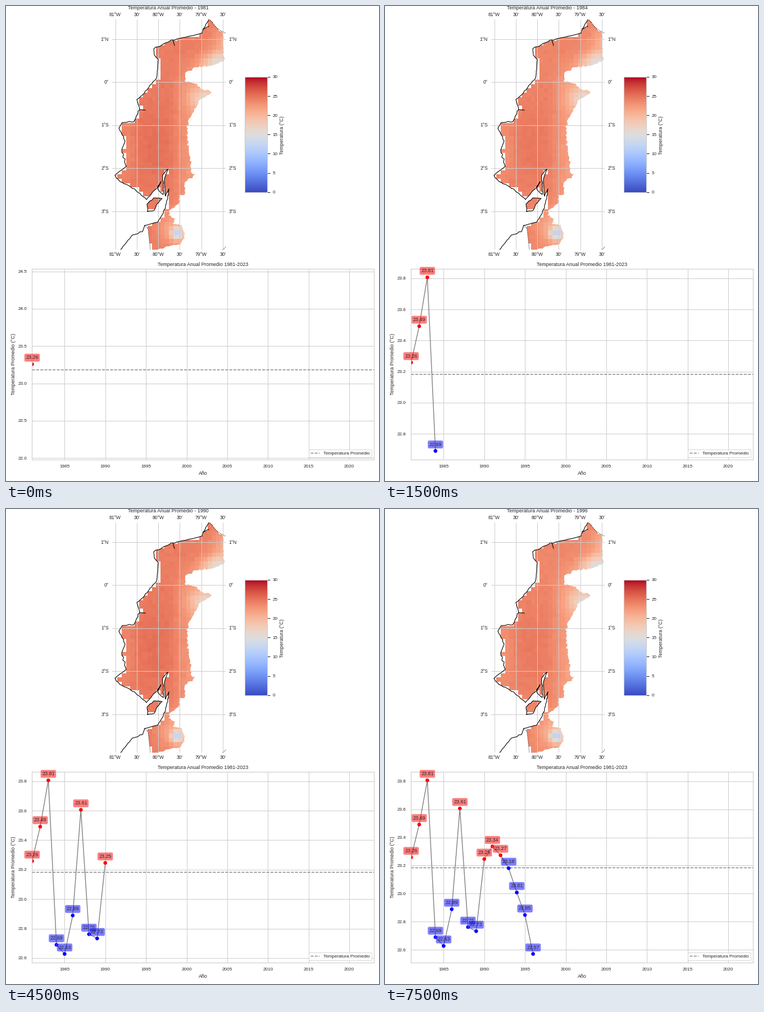
A matplotlib script for the animation above (8 s loop, 664x844 px).

```python
import numpy as np
import matplotlib.pyplot as plt
from matplotlib.animation import FuncAnimation
from matplotlib.path import Path

W, H = 664, 844
INK, GRID = "0.15", "0.8"
BIG, SMALL = 8.85, 8.1
plt.rcParams.update({
    "font.family": ["Liberation Sans", "DejaVu Sans"],
    "text.color": INK, "axes.labelcolor": INK,
    "xtick.color": INK, "ytick.color": INK,
    "axes.edgecolor": GRID, "axes.linewidth": 1.1,
    "grid.color": GRID, "grid.linewidth": 1.0,
    "legend.fontsize": SMALL,
})

FIRST, LAST = 1981, 2023
TEMPS = [23.258, 23.4917, 23.806, 22.69, 22.628, 22.889, 23.606, 22.762,
         22.733, 23.246, 23.336, 23.273, 23.181, 23.008, 22.848, 22.571]
MEAN = 23.185

# Map geometry, in stage pixels
DEG, LON80, EQUATOR = 76.5, 271, 135
LEFT, TOP, RIGHT, BOTTOM = 189, 24, 391, 433
CELL = DEG / 10
ROWS, COLS = 54, 27

# Key points only; rough() adds the small detail
COAST = [(361, 24), (351, 41), (349, 48), (330, 53), (303, 59), (283, 66),
         (263, 76), (264, 87), (271, 95), (268, 128), (243, 158), (233, 166),
         (238, 184), (227, 206), (207, 207), (201, 217), (212, 240),
         (206, 256), (214, 285), (194, 301), (203, 312), (229, 325),
         (250, 344), (266, 326), (276, 312), (270, 325), (280, 335),
         (279, 300), (288, 290), (282, 308), (284, 338), (290, 325),
         (288, 342), (280, 368), (270, 384), (247, 390)]
PERU = [(247, 390), (243, 401), (225, 407), (203, 434)]
INLETS = [[(297, 60), (300, 70)], [(238, 184), (248, 185)],
          [(351, 41), (361, 36)]]
ISLAND = [(252, 365), (251, 352), (263, 341), (278, 342), (268, 353),
          (264, 363), (252, 365)]
EAST = [(363, 24), (386, 48), (388, 97), (366, 106), (345, 107), (321, 117),
        (318, 133), (340, 138), (347, 147), (366, 153), (347, 165),
        (324, 205), (322, 230), (326, 255), (330, 296), (337, 298),
        (318, 314), (318, 335), (308, 336), (308, 350), (291, 363),
        (289, 372), (301, 378), (297, 387), (313, 389), (318, 412),
        (309, 424), (290, 427), (270, 433)]
BORDERS = [[(247, 390), (253, 396), (257, 433)],
           [(363, 25), (377, 41), (392, 49)],
           [(386, 433), (392, 427)]]

# Warm and cool spots: x, y, x spread, y spread, degrees
SPOTS = [(262, 245, 36, 85, 0.9), (214, 255, 14, 60, -0.8),
         (378, 104, 28, 20, -8), (394, 68, 26, 32, -3.5),
         (353, 165, 24, 20, -6), (305, 404, 11, 10, -9),
         (302, 394, 28, 30, -3.5)]


def rough(points, amp, step, seed):
    """Subdivide a polyline and shake the new points, keeping the key ones."""
    rng = np.random.default_rng(seed)
    pts = np.array(points, float)
    out = [pts[:1]]
    for a, b in zip(pts[:-1], pts[1:]):
        n = max(1, int(np.hypot(*(b - a)) / step))
        part = a + (b - a) * np.linspace(0, 1, n + 1)[1:, None]
        part[:-1] += rng.normal(0, amp, (n - 1, 2))
        out.append(part)
    return np.vstack(out)


def polygon(*parts):
    pts = np.vstack(parts)
    return Path(np.vstack([pts, pts[:1]]), closed=True)


coast = rough(COAST, 0.6, 4, 1)
peru = rough(PERU, 0.5, 4, 2)
island = rough(ISLAND, 0.4, 4, 3)
east = rough(EAST, 0.9, 3, 4)
region = Path.make_compound_path(polygon(coast, BORDERS[0], east[::-1]),
                                 polygon(island))

X_EDGES = LON80 + (np.arange(COLS + 1) - 10.5) * CELL
Y_EDGES = EQUATOR + (np.arange(ROWS + 1) - 14.5) * CELL


def base_field():
    """Mean temperature per cell; cells that reach into the sea are empty."""
    x, y = np.meshgrid(X_EDGES[:-1] + CELL / 2, Y_EDGES[:-1] + CELL / 2)
    t = np.full(x.shape, 24.4)
    for cx, cy, sx, sy, amount in SPOTS:
        t += amount * np.exp(-((x - cx) / sx) ** 2 - ((y - cy) / sy) ** 2)
    t -= 2 * np.clip((x - 292) / 36, 0, 1) * np.clip((y - 80) / 60, 0, 1)
    t += np.random.default_rng(7).normal(0, 0.14, t.shape)

    inland = polygon(coast, [(257, 440), (400, 440), (400, 20)])
    cells = np.column_stack([x.ravel(), y.ravel()])
    land = (inland.contains_points(cells - [3, 0])
            | polygon(island).contains_points(cells))
    return np.ma.array(t, mask=~land.reshape(t.shape))


FIELD = base_field()
fig = plt.figure(figsize=(W / 72, H / 72), dpi=72, facecolor="white")


def box(x0, y0, x1, y1):
    return [x0 / W, 1 - y1 / H, (x1 - x0) / W, (y1 - y0) / H]


def label(x, y, text, **kw):
    return fig.text(x / W, 1 - y / H, text, size=BIG, ha="center", **kw)


geo = fig.add_axes(box(LEFT, TOP, RIGHT, BOTTOM))
bar = fig.add_axes(box(424.6, 126, 465.5, 330.6))
plot = fig.add_axes(box(46.4, 466.7, 654.6, 806))

bar.imshow(np.linspace(0, 30, 256)[:, None], cmap="coolwarm", aspect="auto",
           origin="lower", extent=(0, 1, 0, 30))
bar.set_xticks([])
bar.yaxis.tick_right()
bar.set_yticks(range(0, 31, 5))
bar.tick_params(length=4.5, width=1.1, pad=4.4, labelsize=SMALL)

label(491.8, 229.5, "Temperatura (°C)", rotation=90, va="center")
label(13.8, 636.5, "Temperatura Promedio (°C)", rotation=90, va="center")
map_title = label(289, 6.2, "")
plot_title = label(350.5, 461.8, "Temperatura Anual Promedio 1981-2023")
x_title = label(350.5, 833, "Año")


def draw_map(i, wide):
    shift = 0.6 if wide else 0
    geo.clear()
    geo.set_axis_off()
    geo.set_position(box(LEFT + shift, TOP, RIGHT + shift, BOTTOM))
    geo.set_xlim(LEFT, RIGHT)
    geo.set_ylim(BOTTOM, TOP)

    offset = 0.9 * (TEMPS[i] - TEMPS[0])
    wobble = np.random.default_rng(50 + i).normal(0, 0.05, FIELD.shape)
    mesh = geo.pcolormesh(X_EDGES, Y_EDGES, FIELD + offset + wobble,
                          cmap="coolwarm", vmin=0, vmax=30)
    mesh.set_clip_path(region, geo.transData)

    parts = 3 if wide else 2
    for k in range(-parts, 2 * parts):
        x = LON80 + DEG * k / parts
        geo.plot([x, x], [TOP, BOTTOM], color=GRID, lw=1)
        deg, rest = divmod(80 * parts - k, parts)
        name = f"{rest * 60 // parts}\u2032" if rest else f"{deg}°W"
        for y in (18, 444.5):
            if x < RIGHT:
                geo.text(x, y, name, size=BIG - 0.3, ha="center")
    for lat in range(-3, 2):
        y = EQUATOR - DEG * lat
        geo.plot([LEFT, RIGHT], [y, y], color=GRID, lw=1)
        name = f"{abs(lat)}°" + ("S" if lat < 0 else "N" if lat else "")
        geo.text(LEFT - 6, y + 3, name, size=BIG - 0.3, ha="right")
        geo.text(RIGHT + 5.5, y + 3, name, size=BIG - 0.3, ha="left")

    for line in (coast, peru, island, *INLETS):
        geo.plot(*np.transpose(line), color="black", lw=1.1)
    for line in BORDERS:
        geo.plot(*np.transpose(line), color="black", lw=1.1, ls=":")

    map_title.set_text(f"Temperatura Anual Promedio - {FIRST + i}")
    map_title.set_x((289 + shift) / W)


def draw_plot(i, wide):
    left = 51.2 if wide else 46.4
    mid = (left + 654.6) / 2 / W
    plot_title.set_x(mid)
    x_title.set_x(mid)

    plot.clear()
    plot.set_position(box(left, 466.7, 654.6, 806))
    plot.set_axisbelow(True)
    plot.grid(True)
    plot.tick_params(length=0, pad=8.7, labelsize=SMALL)

    temps = TEMPS[:i + 1]
    years = FIRST + np.arange(i + 1)
    colors = ["red" if t > MEAN else "blue" for t in temps]
    plot.plot(years, temps, color="gray", lw=1.38)
    plot.axhline(MEAN, color="gray", ls="--", lw=1.38,
                 label="Temperatura Promedio")
    plot.scatter(years, temps, c=colors, s=36, lw=0.6, zorder=2.5)
    for year, t, color in zip(years, temps, colors):
        plot.annotate(f"{t:.2f}", (year, t), xytext=(0, 9),
                      textcoords="offset points", ha="center", size=BIG,
                      bbox=dict(boxstyle="round,pad=0.3", fc=color, ec="w",
                                lw=0.7, alpha=0.5))

    plot.set_xlim(FIRST, LAST)
    if i == 0:
        plot.set_ylim(temps[0] * 0.945, temps[0] * 1.055)
    else:
        low, high = min(temps + [MEAN]), max(temps)
        pad = 0.05 * (high - low)
        plot.set_ylim(low - pad, high + pad)
    plot.legend(loc="lower right")


def update(i):
    # Two-decimal tick labels widen the left margin in the second year
    wide = i == 1
    draw_map(i, wide)
    draw_plot(i, wide)
    return []


anim = FuncAnimation(fig, update, frames=len(TEMPS), interval=500,
                     repeat=True, repeat_delay=0, blit=False)
plt.show()
```
